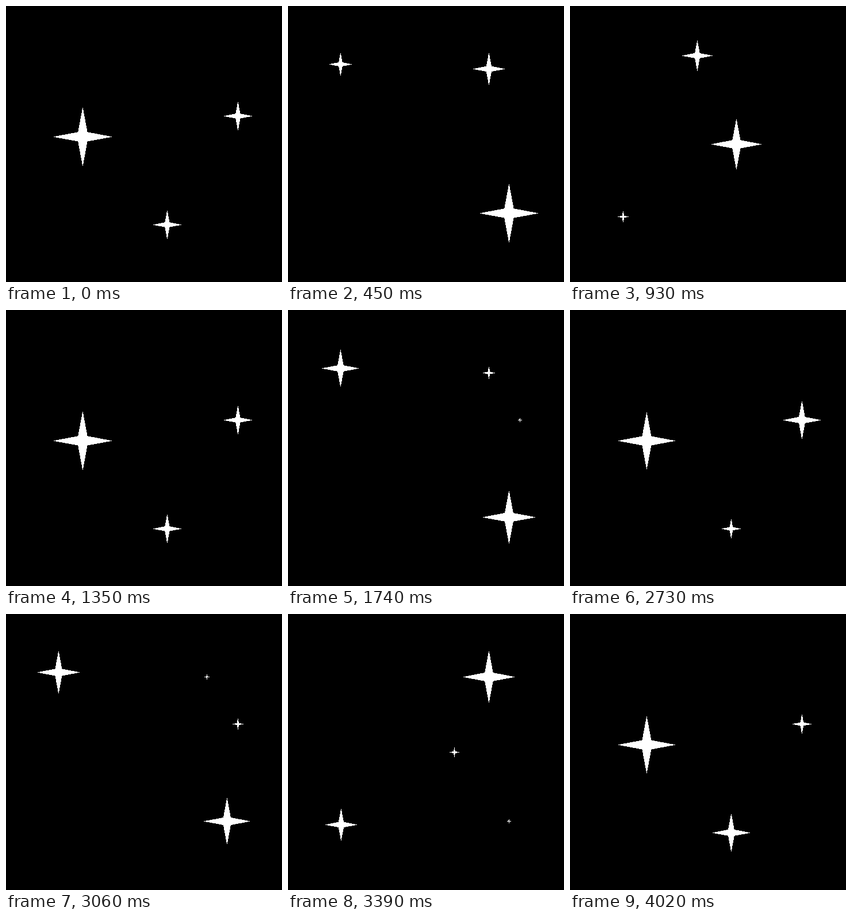
An HTML page with a canvas for the animation above (4.05 s loop, 480x480 px).

```html
<!DOCTYPE html>
<html lang="en">
<head>
<meta charset="utf-8">
<title>Twinkling stars</title>
<style>
  html, body { margin: 0; width: 100%; height: 100%; overflow: hidden; background: #000; }
  canvas { display: block; width: 480px; height: 480px; }
</style>
</head>
<body>
<canvas id="sky" width="480" height="480"></canvas>
<script>
const SIZE = 480;
const STEP = 30;      // ms per picture
const CYCLE = 1350;   // every star twinkles once
const RISE = 300;     // ms from nothing to full size
const WAIST = 0.158 * Math.SQRT2;  // inner corner distance, relative to the radius

const ctx = document.getElementById('sky').getContext('2d', { willReadFrequently: true });

// Stars in the order of their evenly spaced peaks
const stars = [];
const star = (x, y, radius = 52) => stars.push({ x, y, radius });
star(133, 227);
star(403, 191);
star(91, 101, 42);
star(384, 360);
star(349, 109, 58);
star(92, 366, 32);
star(289, 240, 46);
star(221, 86, 42);
star(280, 380);

// 1 at the peak, easing to 0 on both sides
function glow(t, peak) {
  const d = Math.abs(t - peak);
  const gap = Math.min(d, CYCLE - d);
  return gap < RISE ? Math.cos(gap / RISE * Math.PI / 2) ** 2 : 0;
}

function drawStar(x, y, radius) {
  ctx.beginPath();
  for (let i = 0; i < 8; i++) {
    const a = i * Math.PI / 4;
    const r = i % 2 ? radius * WAIST : radius;
    ctx.lineTo(x + r * Math.cos(a), y + r * Math.sin(a));
  }
  ctx.fill();
}

// Turn soft edges into pure black and white
function harden() {
  const img = ctx.getImageData(0, 0, SIZE, SIZE);
  const px = img.data;
  for (let i = 0; i < px.length; i += 4) {
    px[i] = px[i + 1] = px[i + 2] = px[i] > 127 ? 255 : 0;
  }
  ctx.putImageData(img, 0, 0);
}

function draw(t) {
  ctx.fillStyle = '#000';
  ctx.fillRect(0, 0, SIZE, SIZE);
  ctx.fillStyle = '#fff';
  stars.forEach(({ x, y, radius }, i) => {
    const r = radius * glow(t, i * CYCLE / stars.length);
    if (r > 2) drawStar(x + 0.4, y + 0.4, r);
  });
  harden();
}

const start = performance.now();
let shown = -1;
function tick() {
  const t = Math.floor((performance.now() - start) / STEP) * STEP % CYCLE;
  if (t !== shown) draw(shown = t);
  requestAnimationFrame(tick);
}
tick();
</script>
</body>
</html>
```
